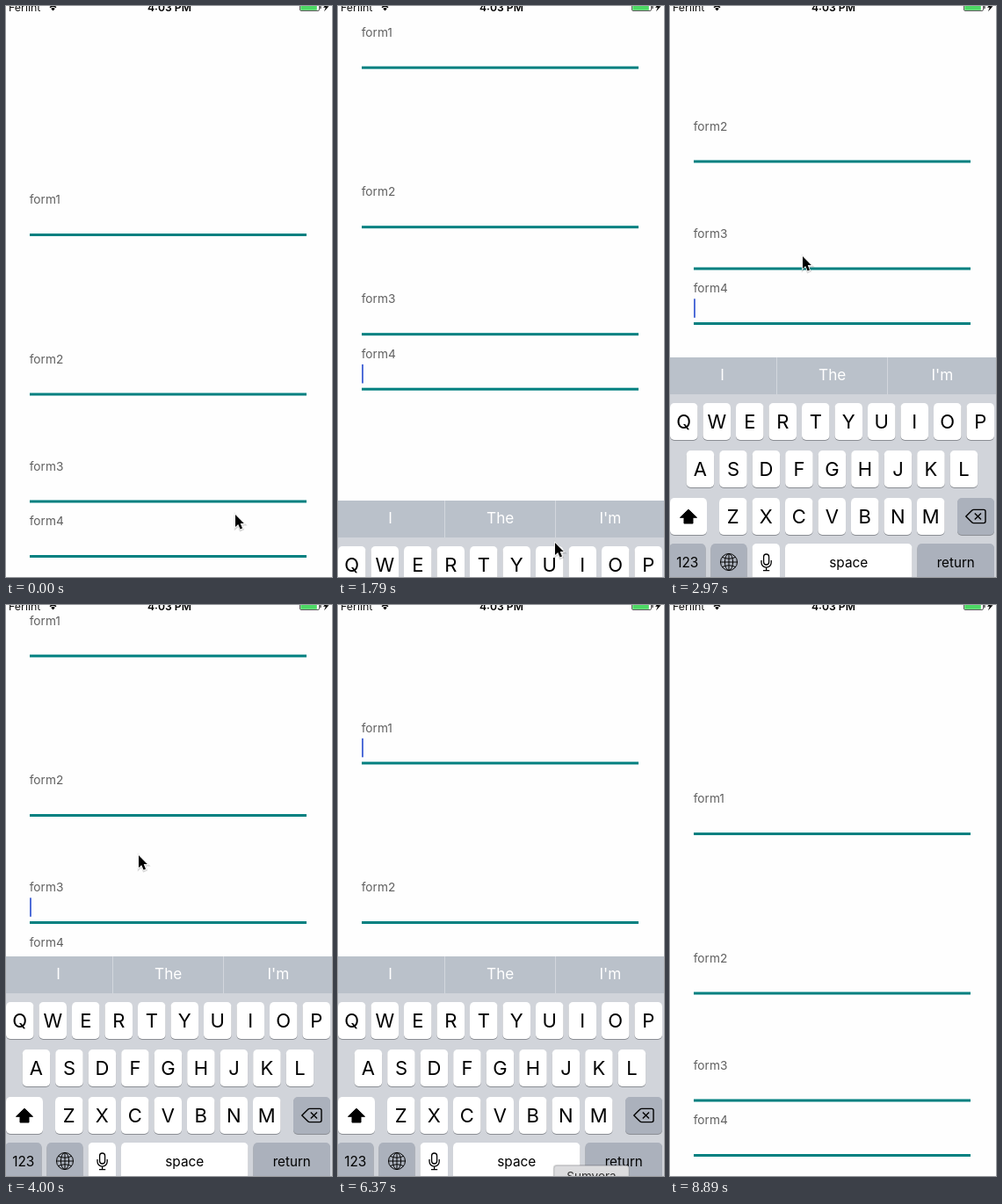
An HTML page that plays this animation: 371x650 px, repeating every 9470 ms.

```html
<!DOCTYPE html>
<html lang="en">
<head>
<meta charset="utf-8">
<title>Form with keyboard</title>
<style>
  html, body { margin: 0; width: 100%; height: 100%; overflow: hidden; background: #fefefe; }
  svg { display: block; width: 100%; height: 100%; }
  text { font-family: Inter, Roboto, sans-serif; }
</style>
</head>
<body>
<svg id="stage" viewBox="0 0 371 650"></svg>
<script>
const LOOP = 9470, STEP = 148;
const TEAL = '#008080', GREY = '#abb1bc';
const stage = document.getElementById('stage');

function add(parent, tag, attrs, text) {
  const node = document.createElementNS('http://www.w3.org/2000/svg', tag);
  for (const name in attrs) node.setAttribute(name, attrs[name]);
  if (text) node.textContent = text;
  parent.appendChild(node);
  return node;
}
const group = () => add(stage, 'g', {});
const label = (parent, text, x, y, size, fill, more) =>
  add(parent, 'text', { x, y, 'font-size': size, fill, ...more }, text);
const centred = { 'text-anchor': 'middle' };
const stroke = (parent, d, width = 1.2, colour = '#000') =>
  add(parent, 'path', { d, fill: 'none', stroke: colour, 'stroke-width': width });

// Form
const form = group();
const lineY = [260.5, 442, 564, 626.5];
lineY.forEach((y, i) => {
  label(form, 'form' + (i + 1), 26.7, y - 35.2, 13.7, '#606060');
  add(form, 'rect', { x: 27, y: y - 1.5, width: 315, height: 3, fill: TEAL });
});
const caret = add(form, 'rect', { x: 27, width: 1.9, height: 21.5, fill: '#4767d6' });

// Status bar
const bar = group();
label(bar, 'Ferlint', 3, 6, 12.4, '#111');
label(bar, '4:03 PM', 186, 6, 12.2, '#000', { ...centred, 'font-weight': 600 });
stroke(bar, 'M48 -.5Q53.5 -5 59 -.5M50 1.7Q53.5 -1.2 57 1.7', 1.6);
add(bar, 'path', { d: 'M51.2 3Q53.5 1.2 55.8 3L53.5 5.4Z' });
add(bar, 'rect', { x: 334.5, y: -4, width: 22, height: 9.5, rx: 1.5, fill: '#fefefe', stroke: '#333', 'stroke-width': .8 });
add(bar, 'rect', { x: 335.3, y: -3, width: 18.5, height: 7.8, fill: '#4cd964' });
add(bar, 'rect', { x: 357.3, y: -1, width: 1.3, height: 4, fill: '#333' });
add(bar, 'path', { d: 'M366 -4L361 1.8H363.8L362 6.2L367.5 .2H364.6Z' });

// Keyboard
const board = group();
add(board, 'rect', { y: 400, width: 371, height: 260, fill: '#d1d4da' });
add(board, 'rect', { y: 400, width: 371, height: 42, fill: '#bac1ca' });
[121.5, 247.5].forEach(x => stroke(board, `M${x} 400V442`, 1, '#d3d7dd'));
['I', 'The', "I'm"].forEach((word, i) =>
  label(board, word, 59.5 + i * 125.2, 425.5, 17.2, '#fff', centred));

function key(x, y, width, text, size = 22, fill = '#fff') {
  const box = { x, width, height: 42, rx: 5 };
  add(board, 'rect', { ...box, y: y + 1, fill: '#8b8e94' });
  add(board, 'rect', { ...box, y, fill });
  if (text) label(board, text, x + width / 2, y + (size > 20 ? 29.3 : 26.5), size, '#000', centred);
}
['QWERTYUIOP', 'ASDFGHJKL', 'ZXCVBNM'].forEach((row, r) =>
  [...row].forEach((c, i) => key(r * 18.7 + (r === 2 ? 18.6 : 0) + i * 37.5, 452 + r * 54, 31.5, c)));
key(0, 560, 42);
key(327, 560, 42, '', 0, GREY);
key(-1, 612, 41.5, '123', 15.4, GREY);
key(46.5, 612, 41, '', 0, GREY);
key(93.5, 612, 31.5);
key(131, 612, 144.5, 'space', 15.4);
key(281.5, 612, 87.5, 'return', 15.2, GREY);

add(board, 'path', { d: 'M21 573L30.5 582.3H26V589H16V582.3H11.5Z', stroke: '#000', 'stroke-linejoin': 'round' });
stroke(board, 'M336.8 581L343.6 574.2Q344.4 573.4 345.5 573.4H357Q359 573.4 359 575.4V586.6Q359 588.6 357 588.6H345.5Q344.4 588.6 343.6 587.8ZM346.8 577.4L354 584.6M354 577.4L346.8 584.6', 1.4);
[9.5, 4.6].forEach(rx =>
  add(board, 'ellipse', { cx: 67, cy: 633, rx, ry: 9.5, fill: 'none', stroke: '#000' }));
stroke(board, 'M57.5 633H76.5M67 623.5V642.5M59.6 627.4Q67 631 74.4 627.4M59.6 638.6Q67 635 74.4 638.6', 1);
add(board, 'rect', { x: 106.6, y: 624, width: 6, height: 12, rx: 3, fill: 'none', stroke: '#000', 'stroke-width': 1.3 });
stroke(board, 'M104 631V633.5A5.6 5.6 0 0 0 115.2 633.5V631M109.6 639V642.5M106 642.7H113.2', 1.3);

// Dock tooltip
const tip = group();
add(tip, 'rect', { x: 244.8, y: 637, width: 87, height: 30, rx: 4, fill: '#000', opacity: .16 });
add(tip, 'rect', { x: 246, y: 638.3, width: 85, height: 30, rx: 3, fill: '#dcdcde', stroke: '#b4b5b9', 'stroke-width': .7 });
label(tip, 'Sumvora', 288.5, 654.8, 13.5, '#333', centred);

// Pointer with a soft shadow
const pointer = group();
const arrow = 'M0 0V14L3.2 11L5.6 16.5L8 15.5L5.7 10H9.8Z';
add(pointer, 'path', { d: arrow, stroke: '#000', 'stroke-width': 3, opacity: .14, transform: 'translate(.3 1)' });
add(pointer, 'path', { d: arrow, stroke: '#fff', 'stroke-width': 1.6, 'paint-order': 'stroke' });

// Each tap focuses a field (or none) and scrolls the form
const taps = [
  { at: 1719, field: 3, scroll: -265 },
  { at: 3360, field: 2, scroll: -202.5 },
  { at: 4600, field: 1, scroll: -80.5 },
  { at: 5760, field: 0, scroll: -80.5 },
  { at: 7843.7, scroll: 0 }
];
const trips = [
  { from: 0, to: 740, x: 247, y: 611 },
  { from: 1900, to: 2950, x: 151, y: 285 },
  { from: 4000, to: 4850, x: 135, y: 233.5 },
  { from: 5000, to: 5470, x: 133, y: 173 },
  { from: 6100, to: 6364, x: 285, y: 680 },
  { from: 6400, to: 6940, x: 335, y: 623 }
];

const clamp = v => Math.min(1, Math.max(0, v));
const smooth = p => p * p * (3 - 2 * p);
const mix = (a, b, p) => a + (b - a) * p;
const settle = age => age > 0 ? 1 - Math.exp(-age / 45) : 0;

function blink(age) {
  if (age < 740) return 1;
  const phase = (age - 740) % 1000;
  return phase < 440 ? 0 : clamp((1000 - phase) / 200);
}

const move = (node, x, y) => node.setAttribute('transform', `translate(${x} ${y})`);
const show = (node, on) => node.setAttribute('visibility', on ? 'visible' : 'hidden');

function draw(time) {
  const t = Math.floor(time / STEP) * STEP;

  const scroll = taps.reduce((y, tap) => mix(y, tap.scroll, settle(t - tap.at)), 0);
  move(form, 0, scroll);
  move(board, 0, 260 * (1 - settle(t - 1755) + settle(t - taps[4].at)));

  const spot = trips.reduce((pos, trip) => {
    const p = smooth(clamp((t - trip.from) / (trip.to - trip.from)));
    return { x: mix(pos.x, trip.x, p), y: mix(pos.y, trip.y, p) };
  }, { x: 261, y: 579 });
  move(pointer, spot.x, spot.y);
  show(pointer, t < 8880);
  show(tip, t > 6300 && t < 6500);

  const tap = taps.filter(k => k.at <= t).pop();
  const active = tap && tap.field !== undefined;
  caret.setAttribute('opacity', active ? blink(t - tap.at) : 0);
  if (active) caret.setAttribute('y', lineY[tap.field] - 28.2);
}

const start = performance.now();
function tick() {
  draw((performance.now() - start) % LOOP);
  requestAnimationFrame(tick);
}
tick();
</script>
</body>
</html>
```
